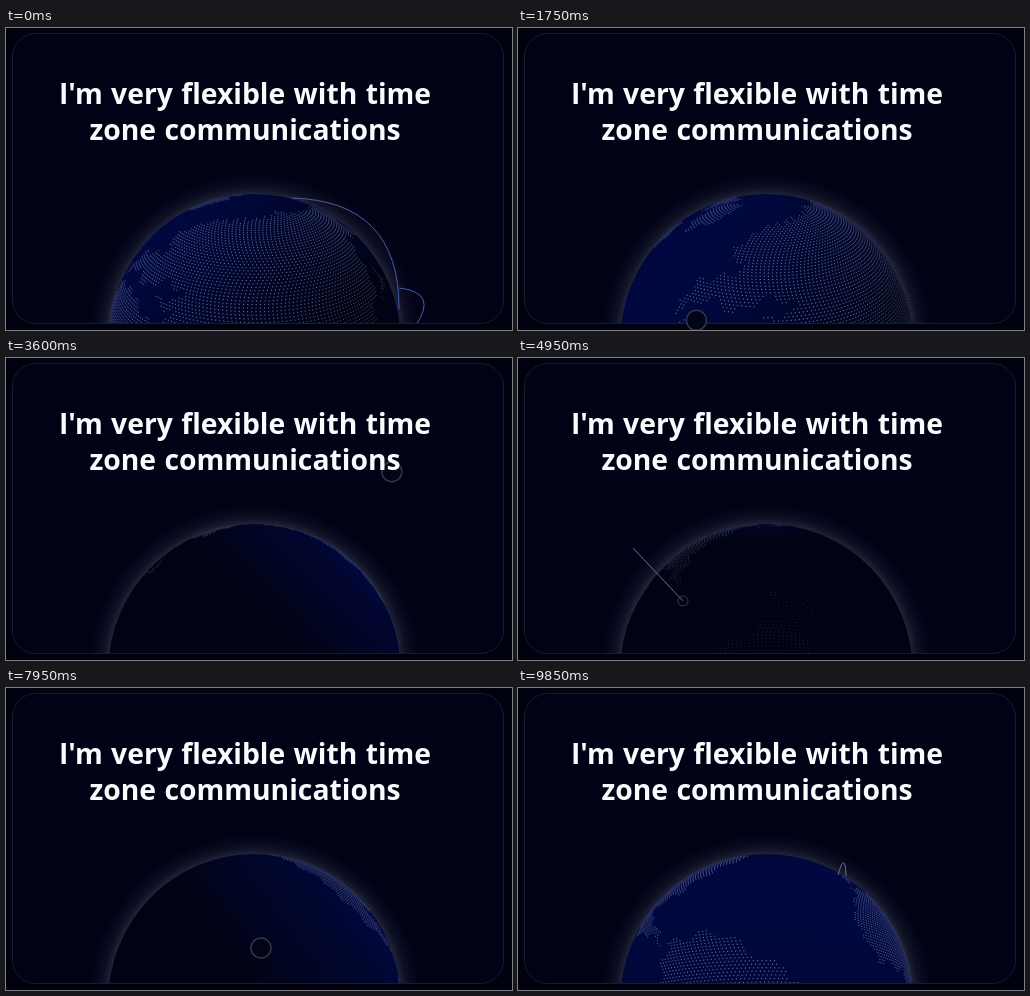
Recreate the animation shown at these times as an HTML page with a canvas. Size 506x302 px, loop 9.9 s.

```html
<!DOCTYPE html>
<html lang="en">
<head>
<meta charset="utf-8">
<style>
  html, body { margin: 0; width: 100%; height: 100%; overflow: hidden; background: #00010f; }
  canvas { position: absolute; left: 0; top: 0; }
  h1 {
    position: absolute; left: 9px; top: 47px; width: 460px; margin: 0;
    font: 700 28.3px/36px "Open Sans", "Noto Sans", sans-serif; word-spacing: 1px;
    color: #f8fcfc; text-align: center; white-space: nowrap;
  }
</style>
</head>
<body>
<canvas id="stage" width="506" height="302"></canvas>
<h1>I'm very flexible with time<br>zone communications</h1>
<script>
const ctx = document.getElementById('stage').getContext('2d');
const LOOP = 9900, CX = 248.5, CY = 312, R = 146, DISTANCE = 3;
const FOCAL = R * Math.sqrt(DISTANCE ** 2 - 1);
const RAD = Math.PI / 180;

// A few corners per land mass (longitude, latitude); sine waves roughen the coasts
const corners = {
  northAmerica: [-166,66, -100,71, -94,58, -80,53, -62,59, -56,50, -81,30, -97,27, -89,19, -79,8, -106,21, -124,42, -135,58],
  southAmerica: [-78,8, -61,10, -35,-6, -48,-27, -72,-52, -71,-18, -81,-5],
  africa: [-17,14, -8,34, 10,37, 33,31, 43,12, 51,11, 40,-10, 32,-28, 19,-34, 9,3, -8,4],
  eurasia: [-9,37, -3,48, 20,55, 6,60, 26,71, 104,77, 180,68, 158,52, 140,56, 128,38, 121,31, 108,20, 104,2, 98,16,
    90,22, 77,8, 66,25, 45,13, 35,30, 37,37, 27,39, 41,42, 30,46, 18,40, 8,44],
  australia: [114,-22, 142,-11, 153,-28, 140,-38, 116,-35],
  greenland: [-68,77, -30,82, -22,70, -43,60],
  arctic: [-120,72, -70,82, -65,67],
  newGuinea: [131,-1, 150,-10, 138,-8],
  japan: [130,32, 141,36, 142,44]
};
const land = new Path2D();
for (const shape of Object.values(corners)) {
  const outline = new Path2D();
  for (let i = 0; i < shape.length; i += 2) outline.lineTo(shape[i], shape[i + 1]);
  outline.closePath();
  land.addPath(outline);
}
const isLand = (lon, lat) =>
  ctx.isPointInPath(land, lon + 1.5 * Math.sin(lat * 0.8), lat + 1.2 * Math.sin(lon * 0.6));

function toVector(lon, lat) {
  const c = Math.cos(lat * RAD);
  return [c * Math.sin(lon * RAD), Math.sin(lat * RAD), c * Math.cos(lon * RAD)];
}

const dots = [];
for (let lat = -56, row = 0; lat < 84; lat += 1.02, row++) {
  const step = 1.18 / Math.cos(lat * RAD);
  for (let lon = -180 + (row % 2) * step / 2; lon < 180; lon += step) {
    if (isLand(lon, lat)) dots.push(toVector(lon, lat));
  }
}
const sun = toVector(-45, 38);

// Time, longitude and latitude facing the viewer
const view = [[0, 70, 33], [1400, 64, 33], [2550, -95, 36], [4400, -223, -27], [5200, -227, -27],
  [6400, -351, -11], [7950, -505, -11], [9000, -402, -11], [LOOP, -406, -11]];
// Time, x and y of the round pointer on its two visits
const pointers = [
  [[1400, 190, 315], [2550, 138, 213], [4300, 520, 60]],
  [[5200, 520, 140], [6400, 322, 264], [7950, 255, 260], [9000, 520, 20]]
];
// Each arc: time of full length, both ends, sideways bulge
const ARC_LIFE = 1000;
const arcs = [
  [0, 285, 170, 393, 281, 76],
  [0, 393, 260, 410, 297, 34],
  [900, 165, 242, 379, 294, 56],
  [900, 379, 246, 215, 296, -18],
  [4950, 165, 243, 115, 190, 0],
  [6400, 369, 197, 394, 292, 34],
  [9850, 320, 187, 328, 188, 26]
];

function valueAt(keys, t) {
  const i = Math.max(1, keys.findIndex(k => k[0] >= t));
  const a = keys[i - 1], b = keys[i];
  const p = (t - a[0]) / (b[0] - a[0]);
  const ease = p * p * (3 - 2 * p);
  return [1, 2].map(n => a[n] + (b[n] - a[n]) * ease);
}

function turner(lon, lat) {
  const sl = Math.sin(lon * RAD), cl = Math.cos(lon * RAD);
  const st = Math.sin(lat * RAD), ct = Math.cos(lat * RAD);
  return ([x, y, z]) => {
    const depth = z * cl + x * sl;
    return [x * cl - z * sl, y * ct - depth * st, depth * ct + y * st];
  };
}

function disc(x, y, r, fill) {
  ctx.beginPath();
  ctx.arc(x, y, r, 0, 7);
  ctx.fillStyle = fill;
  ctx.fill();
}

function drawGlobe(t) {
  const turn = turner(...valueAt(view, t));
  const [lx, ly, lz] = turn(sun);

  const halo = ctx.createRadialGradient(CX, CY, R - 2, CX, CY, R + 20);
  halo.addColorStop(0, 'rgba(115,120,140,.34)');
  halo.addColorStop(0.4, 'rgba(85,90,112,.15)');
  halo.addColorStop(1, 'rgba(60,65,90,0)');
  disc(CX, CY, R + 20, halo);

  // Lambert light along the diameter that points at the sun
  const side = Math.hypot(lx, ly) || 0.01;
  const dx = lx / side * R, dy = -ly / side * R;
  const shade = ctx.createLinearGradient(CX - dx, CY - dy, CX + dx, CY + dy);
  for (let s = -1; s <= 1; s += 0.125) {
    const light = Math.max(0, 0.2 + 0.8 * (side * s + lz * Math.sqrt(1 - s * s)));
    shade.addColorStop((s + 1) / 2, `rgb(1,${3 + 5 * light},${20 + 45 * light})`);
  }
  disc(CX, CY, R, shade);

  const horizon = 1 / DISTANCE;
  ctx.fillStyle = '#b8c6e6';
  for (const dot of dots) {
    const [x, y, z] = turn(dot);
    if (z < horizon) continue;
    const scale = FOCAL / (DISTANCE - z);
    const py = CY - y * scale;
    if (py > 297) continue;
    const light = Math.min(1, Math.max(0, 0.8 + x * lx + y * ly + z * lz));
    const facing = (z - horizon) / (1 - horizon);
    ctx.globalAlpha = (0.14 + 0.46 * light) * facing ** 0.6;
    ctx.fillRect(CX + x * scale - 0.55, py - 0.55, 1.1, 1.1);
  }
  ctx.globalAlpha = 1;
}

function drawArcs(t) {
  ctx.lineWidth = 1;
  arcs.forEach(([peak, x1, y1, x2, y2, bulge], i) => {
    const p = (t - peak) / ARC_LIFE + 0.5;
    if (p < 0 || p > 1) return;
    const dx = x2 - x1, dy = y2 - y1, length = Math.hypot(dx, dy);
    const reach = length + 2 * Math.abs(bulge);
    ctx.strokeStyle = i < 3 ? '#465cb0' : '#626f90';
    ctx.setLineDash([reach, 3 * reach]);
    ctx.lineDashOffset = reach * (1 - 2 * p);
    ctx.beginPath();
    ctx.moveTo(x1, y1);
    ctx.quadraticCurveTo((x1 + x2) / 2 + dy / length * bulge, (y1 + y2) / 2 - dx / length * bulge, x2, y2);
    ctx.stroke();
    ctx.setLineDash([]);
    // A ring spreads where an arc leaves the near side
    if (Math.hypot(x1 - CX, y1 - CY) < R * 0.95) {
      ctx.globalAlpha = 1 - p;
      ctx.beginPath();
      ctx.arc(x1, y1, 10 * p, 0, 7);
      ctx.stroke();
      ctx.globalAlpha = 1;
    }
  });
}

function drawPointer(t) {
  const keys = pointers.find(k => t >= k[0][0] && t <= k[k.length - 1][0]);
  if (!keys) return;
  disc(...valueAt(keys, t), 10, '#020515');
  ctx.strokeStyle = '#30364b';
  ctx.lineWidth = 1.5;
  ctx.stroke();
}

const card = new Path2D();
card.roundRect(6.5, 5.5, 491, 290, 23);

function draw(now) {
  const t = now % LOOP;
  ctx.fillStyle = '#00010f';
  ctx.fillRect(0, 0, 506, 302);
  ctx.save();
  ctx.fillStyle = '#010216';
  ctx.fill(card);
  ctx.clip(card);
  drawGlobe(t);
  drawArcs(t);
  ctx.restore();
  ctx.strokeStyle = '#191c2c';
  ctx.lineWidth = 1;
  ctx.stroke(card);
  drawPointer(t);
  requestAnimationFrame(draw);
}
requestAnimationFrame(draw);
</script>
</body>
</html>
```
